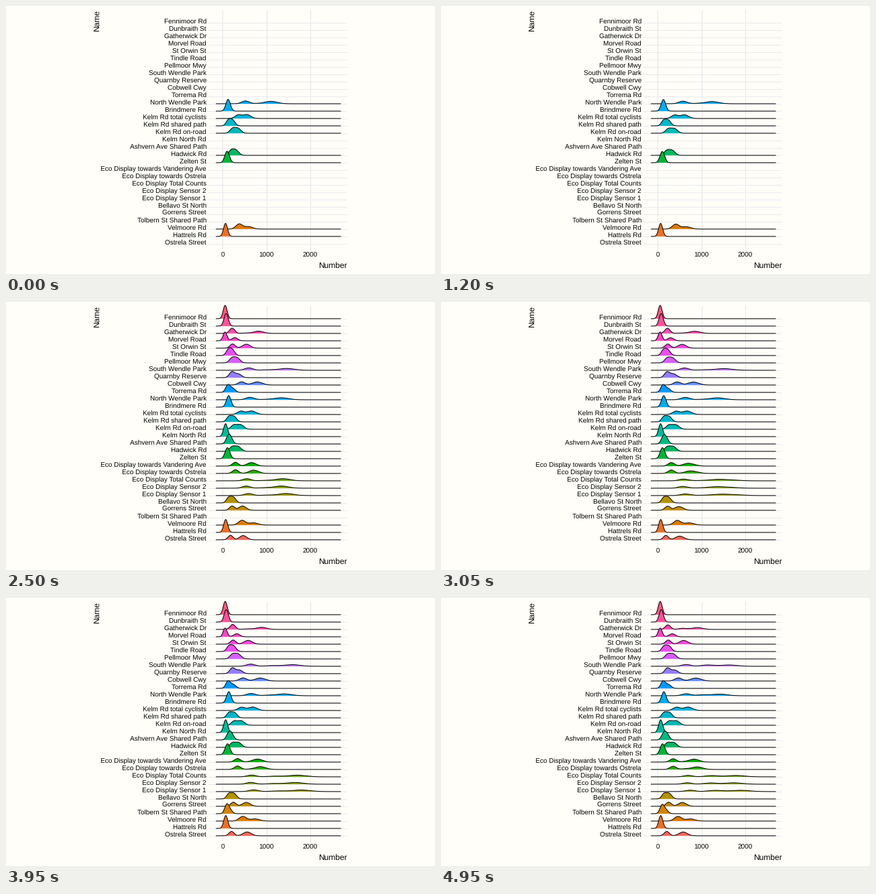
Animation of 640x400 px, one loop 5 s. Source, as a matplotlib script:

```python
import numpy as np
import matplotlib.pyplot as plt
from matplotlib.animation import FuncAnimation

W, H, DPI = 640, 400, 100
FRAMES, INTERVAL, LAST = 100, 50, 4
PX = 72 / DPI                      # points per pixel
PAPER, GRID = "#fffef8", "#e6e6eb"
LEFT, RIGHT, TOP, BOTTOM = 304.2, 508.4, 6, 361
BASE, STEP, AREA = 354.9, 11, 900
VALUES = np.linspace(-150, 2690, 512)

plt.rcParams["font.family"] = ["Liberation Sans", "DejaVu Sans"]
plt.rcParams["text.hinting"] = "none"

# Name, state of first appearance, low and high peak, share of the low peak
SITES = [
    ("Fennimoor Rd", 1, 50, 60),
    ("Dunbraith St", 1, 65, 90),
    ("Gatherwick Dr", 1, 230, 900, .55),
    ("Morvel Road", 2, 55, 330, .65),
    ("St Orwin St", 1, 240, 590),
    ("Tindle Road", 2, 140, 250),
    ("Pellmoor Mwy", 1, 220, 350),
    ("South Wendle Park", 1, 650, 1620),
    ("Quarnby Reserve", 1, 220, 380, .55),
    ("Cobwell Cwy", 1, 470, 870),
    ("Torrema Rd", 1, 120, 240, .6),
    ("North Wendle Park", 0, 650, 1420),
    ("Brindmere Rd", 0, 130, 145),
    ("Kelm Rd total cyclists", 0, 430, 690),
    ("Kelm Rd shared path", 0, 140, 260),
    ("Kelm Rd on-road", 0, 260, 420),
    ("Kelm North Rd", 1, 55, 75),
    ("Ashvern Ave Shared Path", 2, 130, 200),
    ("Hadwick Rd", 0, 220, 360),
    ("Zelten St", 0, 85, 130),
    ("Eco Display towards Vandering Ave", 2, 350, 830),
    ("Eco Display towards Ostrela", 2, 350, 900),
    ("Eco Display Total Counts", 2, 690, 1780, .35),
    ("Eco Display Sensor 2", 2, 670, 1730, .35),
    ("Eco Display Sensor 1", 2, 740, 1880, .35),
    ("Bellavo St North", 1, 140, 255),
    ("Gorrens Street", 2, 250, 560),
    ("Tolbern St Shared Path", 3, 95, 180, .65),
    ("Velmoore Rd", 0, 460, 740, .62),
    ("Hattrels Rd", 0, 60, 75),
    ("Ostrela Street", 2, 205, 580),
]


def to_x(value):
    return 323.4 + 0.0653 * value


def hcl(hue, chroma=112, light=61):
    """Polar Luv colour to clipped sRGB."""
    a = np.radians(hue)
    y = ((light + 16) / 116) ** 3
    u = chroma * np.cos(a) / (13 * light) + 0.19784
    v = chroma * np.sin(a) / (13 * light) + 0.46834
    x = 9 * y * u / (4 * v)
    z = -x / 3 - 5 * y + 3 * y / v
    rgb = np.array([3.2405 * x - 1.5371 * y - 0.4985 * z,
                    -0.9693 * x + 1.8760 * y + 0.0416 * z,
                    0.0556 * x - 0.2040 * y + 1.0572 * z])
    rgb = np.clip(rgb, 0, 1)
    return np.where(rgb > 0.0031308, 1.055 * rgb ** (1 / 2.4) - 0.055, 12.92 * rgb)


def bell(mean):
    """Unit-area bump in pixels; busier sites vary more."""
    spread = 40 + 0.09 * mean
    return AREA / spread * np.exp(-0.5 * ((VALUES - mean) / spread) ** 2)


def density(state, first, low, high, share=.42):
    """Height curve of one site: peaks grow with time, wide gaps fill in late."""
    left = (LAST - state) / (LAST - first)
    low, high = (m * (1 - 0.25 * m / (m + 150) * left ** 2) for m in (low, high))
    fill = np.clip((high - low - 400) / 600, 0, 1) * (0.15 + 0.3 * max(0, state - 3))
    curve = share * bell(low) + (1 - share) * bell(high) + fill * bell((low + high) / 2)
    return curve / (1 + fill)


fig = plt.figure(figsize=(W / DPI, H / DPI), dpi=DPI, facecolor=PAPER)
ax = fig.add_axes([0, 0, 1, 1])
ax.set(xlim=(0, W), ylim=(H, 0))
ax.axis("off")


def label(x, y, text, size, ha="right", **kw):
    ax.text(x, y, text, fontsize=size * PX, color="black", ha=ha, va="baseline",
            rotation_mode="anchor", zorder=200, **kw)


for tick in (0, 1000, 2000):
    ax.plot([to_x(tick)] * 2, [TOP, BOTTOM + 2.7], color=GRID, lw=PX, zorder=1)
    label(to_x(tick), 375, str(tick), 10, ha="center")
label(RIGHT, 391, "Number", 12)
label(138.6, TOP, "Name", 12, rotation=90)

xs = to_x(VALUES)
outline_x = np.concatenate([xs, xs[::-1]])
rows = []
for i, (name, first, *peaks) in enumerate(SITES):
    rank = len(SITES) - 1 - i
    base = BASE - STEP * rank
    ax.plot([LEFT - 2.7, RIGHT], [base] * 2, color=GRID, lw=0.8 * PX, zorder=1)
    label(299, base + 1, name, 10)
    fill, = ax.fill(xs, xs * 0 + base, color=hcl(15 + 360 * rank / len(SITES)),
                    lw=0, zorder=10 + 2 * i)
    line, = ax.plot(xs, xs * 0 + base, color="black", lw=PX, zorder=11 + 2 * i)
    curves = {s: density(s, first, *peaks) for s in range(first, LAST + 1)}
    rows.append((first, curves, base, fill, line))


def blend(curves, state):
    """Linear change of height between neighbouring states."""
    k = min(int(state), LAST - 1)
    return curves[k] + (curves[k + 1] - curves[k]) * (state - k)


def draw(frame):
    state = LAST * frame / (FRAMES - 1)
    for first, curves, base, fill, line in rows:
        shown = state >= first
        fill.set_visible(shown)
        line.set_visible(shown)
        if shown:
            top = base - blend(curves, state)
            floor = np.full_like(top, base)
            fill.set_xy(np.column_stack([outline_x, np.concatenate([top, floor])]))
            line.set_ydata(top)
    return []


anim = FuncAnimation(fig, draw, frames=FRAMES, interval=INTERVAL,
                     init_func=lambda: draw(0), repeat=True, repeat_delay=0)
plt.show()
```
